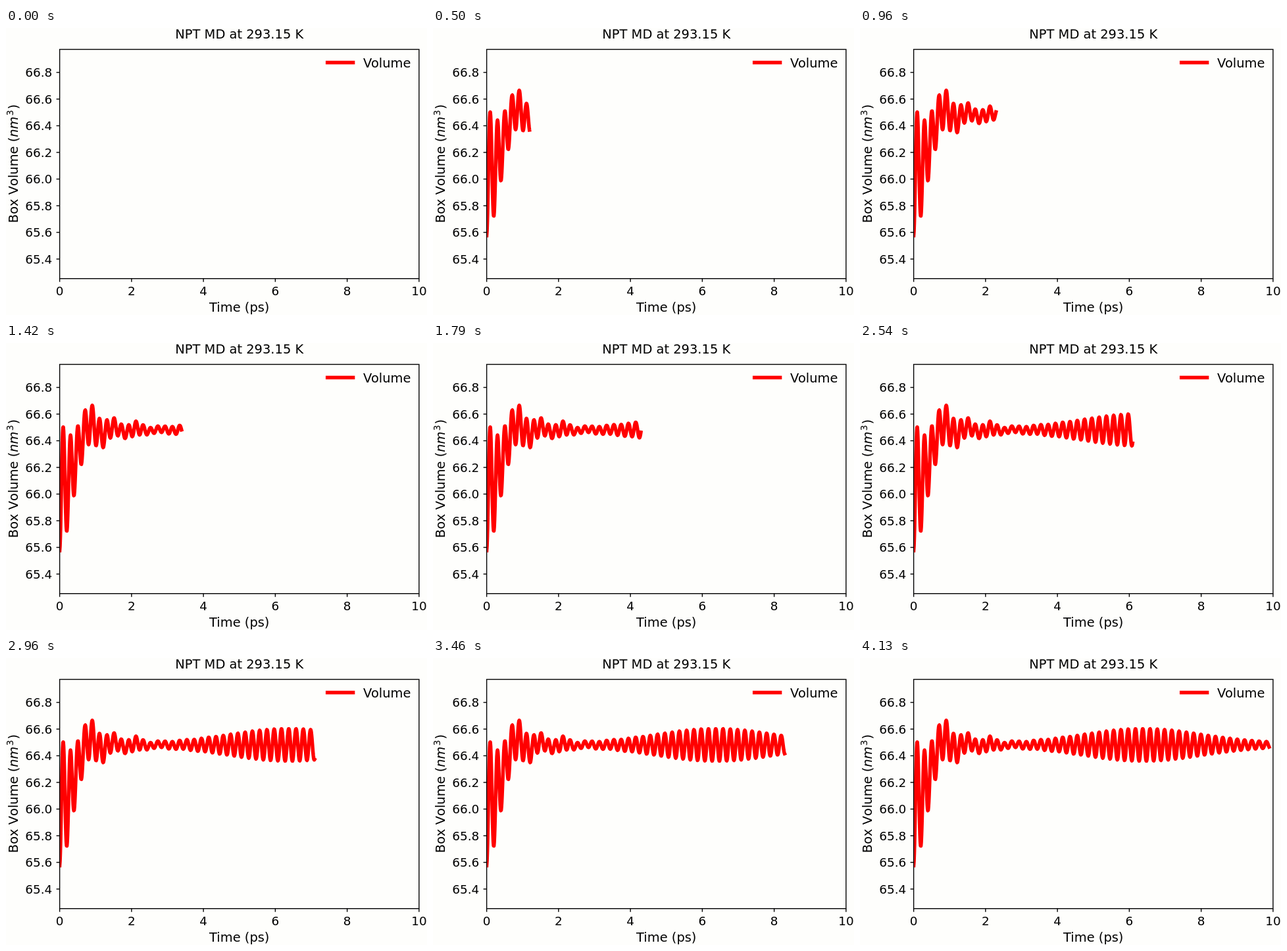
Write an HTML page with a canvas that moves like this. It is 640 px wide and 436 px high and loops after 4180 ms.

```html
<!DOCTYPE html>
<html lang="en">
<head>
<meta charset="utf-8">
<title>Box volume over time</title>
<style>
  html, body { margin: 0; width: 100%; height: 100%; overflow: hidden; background: #fefefc; }
  canvas { display: block; width: 640px; height: 436px; }
</style>
</head>
<body>
<canvas id="plot" width="640" height="436"></canvas>
<script>
const ctx = document.getElementById('plot').getContext('2d');
const LOOP = 4180, FRAMES = 100, FRAME_MS = 125 / 3;
const BOX = { left: 81.6, right: 627.9, top: 32.5, bottom: 380.7 };
const WIDTH = BOX.right - BOX.left, HEIGHT = BOX.bottom - BOX.top;
const PS = WIDTH / 10;
const FAMILY = '"DejaVu Sans", Verdana, sans-serif';
const LABEL = 19.44, TICK = 18.4, LINE = 5.5, RULE = 1.4;
const FIRST_CREST = 87, PERIOD = 11.06;

const bell = (k, mid, width) => Math.exp(-(((k - mid) / width) ** 2));

// k counts oscillations from the first crest.
// The mean eases up to its level, then rings and settles.
function mean(k) {
  const rise = k < 3.5 ? 42 * (1 + Math.cos(Math.PI * k / 3.5)) : 0;
  const ring = k > 3 ? 10 * Math.exp(-0.22 * (k - 3.8)) * Math.cos(2 * Math.PI * (k - 3.8) / 3.2) : 0;
  return 132 + rise - ring;
}

// The swing dies down, beats once and swells again late in the run.
function swing(k) {
  const kick = 46 * Math.max(0, 1 - k / 2) ** 1.3;
  return 2.6 + kick + 40 * bell(k, 0, 6) + 5 * bell(k, 10, 1.2) + 22 * bell(k, 31, 11.4);
}

function volumeY(x) {
  const k = (x - FIRST_CREST) / PERIOD;
  return mean(k) - swing(k) * Math.cos(2 * Math.PI * k);
}

function text(str, x, y, size, align) {
  ctx.font = size + 'px ' + FAMILY;
  ctx.textAlign = align;
  ctx.fillText(str, x, y);
}

function segment(x1, y1, x2, y2) {
  ctx.beginPath();
  ctx.moveTo(x1, y1);
  ctx.lineTo(x2, y2);
  ctx.stroke();
}

function pen(color, width, cap) {
  ctx.strokeStyle = color;
  ctx.lineWidth = width;
  ctx.lineCap = cap;
  ctx.lineJoin = cap === 'butt' ? 'miter' : 'round';
}

function curve(end) {
  ctx.save();
  ctx.beginPath();
  ctx.rect(BOX.left, BOX.top, WIDTH, HEIGHT);
  ctx.clip();
  pen('#f00', LINE, 'square');
  ctx.beginPath();
  for (let x = BOX.left; x < end; x += 0.5) ctx.lineTo(x, volumeY(x));
  ctx.lineTo(end, volumeY(end));
  ctx.stroke();
  ctx.restore();
}

function axes() {
  pen('#000', RULE, 'butt');
  ctx.fillStyle = '#000';
  ctx.strokeRect(BOX.left, BOX.top, WIDTH, HEIGHT);
  for (let v = 0; v <= 10; v += 2) {
    const x = BOX.left + v * PS;
    segment(x, BOX.bottom, x, BOX.bottom + 5);
    text(String(v), x, 406, TICK, 'center');
  }
  for (let i = 0; i < 8; i++) {
    const y = 67.5 + i * 40.5;
    segment(BOX.left - 5, y, BOX.left, y);
    text((66.8 - i * 0.2).toFixed(1), 70.2, y + 6.7, TICK, 'right');
  }
  const mid = (BOX.left + BOX.right) / 2;
  text('NPT MD at 293.15 K', mid, 16, LABEL, 'center');
  text('Time (ps)', mid, 431.3, LABEL, 'center');
}

function volumeLabel() {
  const normal = LABEL + 'px ' + FAMILY;
  const parts = [
    { str: 'Box Volume (', font: normal },
    { str: 'nm', font: 'italic ' + normal },
    { str: '3', font: LABEL * 0.7 + 'px ' + FAMILY, rise: 7.3, pad: 1.2 },
    { str: ')', font: normal }
  ];
  ctx.save();
  ctx.fontKerning = 'none';
  ctx.textAlign = 'left';
  let total = 0;
  for (const p of parts) {
    ctx.font = p.font;
    p.width = ctx.measureText(p.str).width + 2 * (p.pad || 0);
    total += p.width;
  }
  ctx.translate(18.2, 206);
  ctx.rotate(-Math.PI / 2);
  let x = -total / 2;
  for (const p of parts) {
    ctx.font = p.font;
    ctx.fillText(p.str, x + (p.pad || 0), -(p.rise || 0));
    x += p.width;
  }
  ctx.restore();
}

function legend() {
  pen('#f00', LINE, 'square');
  segment(488.7, 52.5, 527.6, 52.5);
  text('Volume', 543.1, 59.5, LABEL, 'left');
}

// Steps fall on hundredths of a second
const stepTime = i => Math.round(i * FRAME_MS / 10) * 10;

function stepAt(ms) {
  let i = Math.min(FRAMES - 1, Math.floor(ms / FRAME_MS) + 1);
  while (i > 0 && stepTime(i) > ms) i--;
  return i;
}

function draw(step) {
  ctx.fillStyle = '#fefefc';
  ctx.fillRect(0, 0, 640, 436);
  if (step > 0) curve(BOX.left + (step * 0.1 - 0.01) * PS);
  axes();
  volumeLabel();
  legend();
}

const begin = performance.now();
function tick() {
  draw(stepAt((performance.now() - begin) % LOOP));
  requestAnimationFrame(tick);
}
tick();
</script>
</body>
</html>
```
